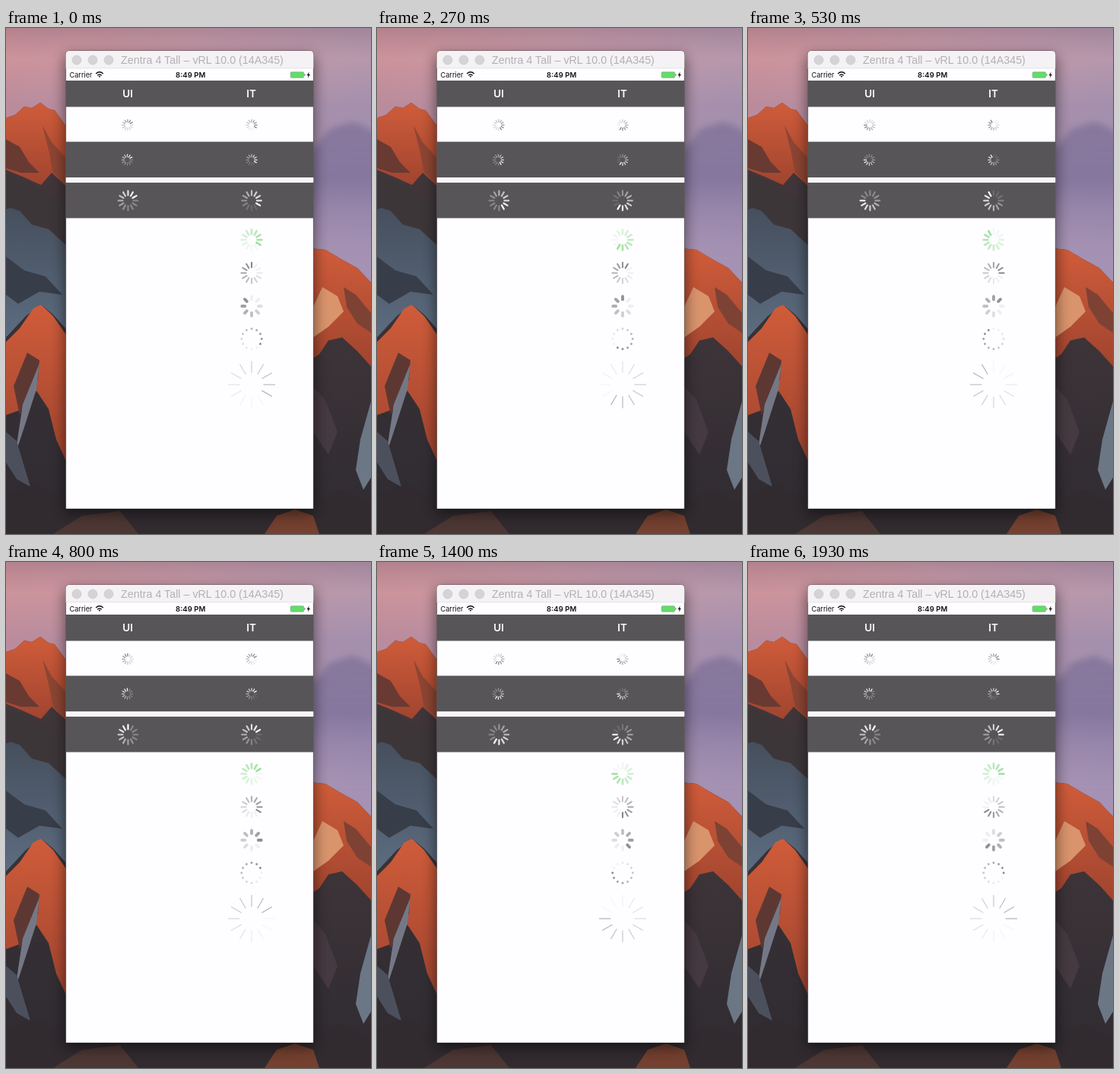
These frames come from a looping animation (480 by 664 pixels, 1990 ms). An HTML page:

```html
<!DOCTYPE html>
<html lang="en">
<head>
<meta charset="utf-8">
<title>Activity indicators</title>
<style>
  html, body { margin: 0; width: 100%; height: 100%; overflow: hidden; background: #3a3335; }
  svg { display: block; width: 480px; height: 664px; }
  text { font-family: Inter, "Liberation Sans", sans-serif; }
  .title { font: 14.3px "Liberation Sans", sans-serif; fill: #b3b1b3; }
  .status { font-size: 9.2px; fill: #111; }
  .clock { font-size: 9.6px; font-weight: 600; fill: #111; }
  .head { font-size: 13.5px; font-weight: 600; fill: #fff; }
  .mid { text-anchor: middle; }
</style>
</head>
<body>
<svg id="stage" viewBox="0 0 480 664">
  <defs>
    <linearGradient id="sky" x1="0" y1="0" x2="1" y2="0.3">
      <stop offset="0" stop-color="#cb8d94"/>
      <stop offset=".45" stop-color="#c295a3"/>
      <stop offset="1" stop-color="#a894b0"/>
    </linearGradient>
    <linearGradient id="dusk" x1="0" y1="0" x2="0" y2="1">
      <stop offset="0" stop-color="#8e6f80" stop-opacity=".4"/>
      <stop offset=".12" stop-color="#d0a0a8" stop-opacity=".3"/>
      <stop offset=".3" stop-color="#9485ab" stop-opacity=".3"/>
      <stop offset="1" stop-color="#a290ba" stop-opacity=".5"/>
    </linearGradient>
    <linearGradient id="cloud" x1="0" y1="0" x2="0" y2="1">
      <stop offset="0" stop-color="#83749a" stop-opacity=".85"/>
      <stop offset=".45" stop-color="#7d6f99" stop-opacity=".75"/>
      <stop offset="1" stop-color="#9585ae" stop-opacity="0"/>
    </linearGradient>
    <linearGradient id="rock" x1="0" y1="0" x2="0" y2="1">
      <stop offset="0" stop-color="#44383c"/>
      <stop offset="1" stop-color="#2e2b31"/>
    </linearGradient>
    <linearGradient id="glow" x1="0" y1="0" x2="0" y2="1">
      <stop offset="0" stop-color="#cf5c3a"/>
      <stop offset="1" stop-color="#a0442f"/>
    </linearGradient>
    <linearGradient id="ice" x1="0" y1="0" x2="0" y2="1">
      <stop offset="0" stop-color="#454e5c"/>
      <stop offset="1" stop-color="#5c6c80"/>
    </linearGradient>
    <filter id="soft" x="-30%" y="-30%" width="160%" height="160%"><feGaussianBlur stdDeviation="9"/></filter>
    <filter id="haze" x="-30%" y="-30%" width="160%" height="160%"><feGaussianBlur stdDeviation="4"/></filter>
  </defs>

  <!-- sky -->
  <rect width="480" height="664" fill="url(#sky)"/>
  <rect width="480" height="340" fill="url(#dusk)"/>
  <path d="M390 168L412 150L425 132L456 123L474 130L500 148V295H390Z" fill="url(#cloud)" filter="url(#haze)"/>

  <!-- left range -->
  <path d="M0 118L12 114L24 103L34 105L45 98L56 106L64 108L80 130V664H0Z" fill="url(#rock)"/>
  <path d="M0 118L12 114L24 103L34 105L45 98L56 106L64 108L80 130V208L60 190L46 206L24 196L0 186Z" fill="url(#glow)"/>
  <path d="M0 146L18 156L30 176L44 190L20 190L0 184Z" fill="#693a32"/>
  <path d="M48 128L60 150L80 172V206L62 190L56 160Z" fill="#8d4533"/>
  <path d="M0 238L20 232L44 252L80 276V396L62 376L46 363L26 378L0 406Z" fill="url(#ice)"/>
  <path d="M0 192L28 202L58 220L80 234V286L56 264L34 258L18 240L0 234Z" fill="#3d3639"/>
  <path d="M0 300L24 318L52 326L74 350L44 346L16 362L0 350Z" fill="#383e49"/>
  <path d="M0 412L18 394L36 368L46 363L62 378L80 404V570L66 540L56 500L40 476L22 500L0 508Z" fill="url(#glow)"/>
  <path d="M28 426L44 436L42 462L28 482L18 508L10 470Z" fill="#5d3833"/>
  <path d="M44 440L40 474L22 530L12 560L22 494Z" fill="#747886"/>
  <path d="M0 530L14 542L32 602L14 592L0 570Z" fill="#4b505c"/>

  <!-- right range -->
  <path d="M400 289L420 291L442 304L462 315L480 334V664H400Z" fill="url(#rock)"/>
  <path d="M400 289L420 291L442 304L462 315L480 334V444L462 424L442 406L424 410L412 428L400 436Z" fill="url(#glow)"/>
  <path d="M404 366L416 340L436 352L444 372L424 392L404 406Z" fill="#d9946c"/>
  <path d="M444 340L460 350L480 374V400L462 388L448 366Z" fill="#7d4234"/>
  <path d="M480 490L466 540L460 580L470 606L480 590Z" fill="#6c7786"/>
  <path d="M404 470L420 488L436 530L424 560L404 530Z" fill="#453a41"/>

  <!-- foothills -->
  <path d="M0 612L40 598L90 630H390L440 606L480 624V664H0Z" fill="#312b2f"/>
  <path d="M340 664L356 640L380 632L404 640L412 664Z" fill="#74402f"/>
  <path d="M62 664L100 640L150 634L174 664Z" fill="#4d3734"/>

  <!-- window -->
  <rect x="77" y="36" width="329" height="602" rx="5" fill="#000" opacity=".48" filter="url(#soft)"/>
  <path d="M78.7 631V35Q78.7 30 84 30H399Q404.3 30 404.3 35V631Z" fill="#fefdff" stroke="#000" stroke-opacity=".4" stroke-width="1"/>
  <path d="M78.7 53V35Q78.7 30 84 30H399Q404.3 30 404.3 35V53Z" fill="#f4f2f4"/>
  <rect x="78.7" y="52.5" width="325.6" height=".7" fill="#dedcdf"/>
  <g fill="#d5d3d5" stroke="#c9c7c9" stroke-width=".7">
    <circle cx="93" cy="42" r="6"/><circle cx="114" cy="42" r="6"/><circle cx="135" cy="42" r="6"/>
  </g>
  <text class="title mid" x="258" y="47">Zentra 4 Tall – vRL 10.0 (14A345)</text>

  <!-- status bar -->
  <text class="status" x="83.5" y="65">Carrier</text>
  <g fill="none" stroke="#111" stroke-width="1.4">
    <path d="M118.2 60Q123 55.6 127.8 60M120.2 62.2Q123 59.6 125.8 62.2"/>
    <path d="M121.6 63.2L123 65L124.4 63.2Q123 62.2 121.6 63.2Z" fill="#111" stroke="none"/>
  </g>
  <text class="clock mid" x="242.7" y="65">8:49 PM</text>
  <rect x="374.2" y="57.8" width="17.4" height="7.4" rx="1.2" fill="#62dd68" stroke="#7a9a7c" stroke-width=".6"/>
  <rect x="392.3" y="60" width="1.1" height="3" rx=".5" fill="#6f8a70"/>
  <path d="M398.6 57.4L395.6 62.2H397.6L396.8 65.8L400 60.8H398Z" fill="#111"/>

  <!-- rows -->
  <g fill="#575558">
    <rect x="78.7" y="69" width="325.6" height="34.5"/>
    <rect x="78.7" y="149.3" width="325.6" height="47"/>
    <rect x="78.7" y="202.7" width="325.6" height="46.8"/>
  </g>
  <rect x="78.7" y="196.3" width="325.6" height="6.4" fill="#f7f6fa"/>
  <text class="head mid" x="160.2" y="91.3">UI</text>
  <text class="head mid" x="322.6" y="91.3">IT</text>
  <g id="spinners"></g>
</svg>
<script>
const LOOP = 1990, FRAME = 200 / 3;
const NS = 'http://www.w3.org/2000/svg';
const layer = document.getElementById('spinners');

const base = { x: 323, n: 12, turn: 1000, head: 4.7, low: 0.12, cap: 'round' };
const small = { r0: 3.9, r1: 7.2, w: 1.25 };
const large = { r0: 7, r1: 12.8, w: 2.2 };
const system = { x: 160, head: 2.7, low: 0.3 };

const spinners = [
  { ...small, ...system, y: 127.3, color: '#7d7b80' },
  { ...small, y: 127.3, color: '#7d7b80' },
  { ...small, ...system, x: 159.5, y: 173, color: '#fff' },
  { ...small, y: 173, color: '#fff' },
  { ...large, ...system, x: 160.5, y: 226.5, color: '#fff' },
  { ...large, y: 226.5, color: '#fff' },
  { y: 278, r0: 7.4, r1: 13.4, w: 2.6, color: '#9fe0a2' },
  { y: 321.5, r0: 7.4, r1: 13.6, w: 2.1, color: '#88868b', turn: 3000, head: 0.9 },
  { y: 365, r0: 8.7, r1: 12.8, w: 3.8, color: '#939196', n: 8, turn: 3000, head: 7.99 },
  { y: 408, r0: 13.2, r1: 13.21, w: 2.9, color: '#8b898f' },
  { y: 468, r0: 15.5, r1: 31, w: 1.1, color: '#acabb4', cap: 'butt' }
].map(s => build({ ...base, ...s }));

function build(s) {
  s.spokes = Array.from({ length: s.n }, (_, i) => {
    const line = document.createElementNS(NS, 'line');
    const attrs = {
      y1: -s.r0, y2: -s.r1, stroke: s.color, 'stroke-width': s.w, 'stroke-linecap': s.cap,
      transform: `translate(${s.x} ${s.y}) rotate(${i * 360 / s.n})`
    };
    for (const key in attrs) line.setAttribute(key, attrs[key]);
    return layer.appendChild(line);
  });
  return s;
}

// Snap to the start of the current tick; ticks lie on multiples of 10 ms.
function snap(t) {
  const start = i => Math.round(i * FRAME / 10) * 10;
  let i = Math.min(29, Math.floor((t + 5) / FRAME));
  if (start(i) > t) i--;
  return start(i);
}

function draw(t) {
  for (const s of spinners) {
    const head = Math.floor(t / s.turn * s.n + s.head);
    s.spokes.forEach((spoke, i) => {
      const age = ((head - i) % s.n + s.n) % s.n;
      spoke.setAttribute('opacity', Math.max(s.low, 1 - age / (s.n - 1)).toFixed(3));
    });
  }
}

function tick() {
  draw(snap(performance.now() % LOOP));
  requestAnimationFrame(tick);
}
tick();
</script>
</body>
</html>
```
